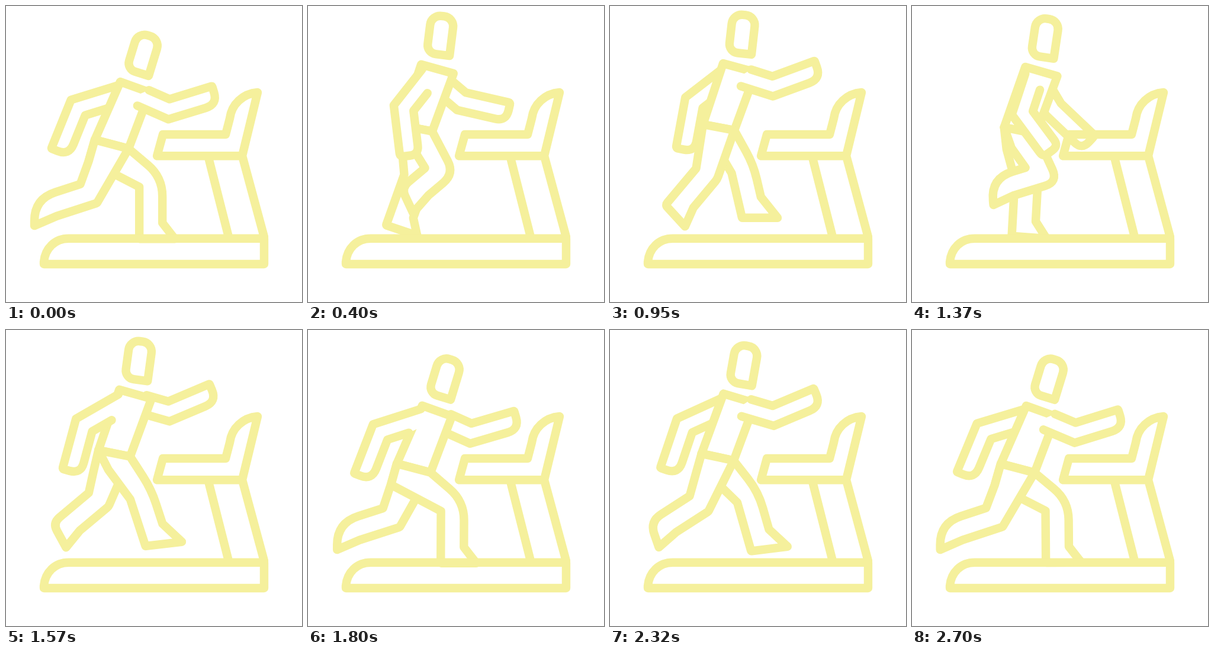
An HTML page with a canvas for the animation above (2.72 s loop, 500 by 500 pixels).

```html
<!DOCTYPE html>
<html lang="en">
<head>
<meta charset="utf-8">
<title>Treadmill runner</title>
<style>
  html, body { margin: 0; width: 100%; height: 100%; overflow: hidden; background: #fff; }
  canvas { display: block; width: 500px; height: 500px; }
</style>
</head>
<body>
<canvas id="stage" width="500" height="500"></canvas>
<script>
const ctx = document.getElementById('stage').getContext('2d');
const LOOP = 2720, HOLD = 220, STEP = 25;

// Moments of contact, apex, contact, ...
const BEATS = [205, 460, 700, 950, 1230, 1515, 1787, 2078, 2720];

// A limb cycle is two strides: stance at 0..1, swing at 1..2.
const KNOTS = [0, .24, .4, .5, 1, 1.24, 1.4, 1.5];

// Joint angles in degrees at the knots; 90 points down.
const LEG = {
  thigh: [44, 82, 93, 105, 115, 64, 61, 60],
  shin: [90, 93, 114, 131, 162, 163, 132, 75],
  foot: [0, 4, 23, 49, 90, 85, 58, -2],
  reach: [96, 97, 93, 85, 90, 84, 67, 81]
};
const ARM = {
  swing: [-82, 31, 58, 90, 78, -7, -31, -46],
  fore: [112, 45, 6, -21, -17, 52, 88, 101]
};
const DROP = [1, .2, .04, 0, 1, .2, .04, 0];

const rad = deg => deg * Math.PI / 180;
const sin = deg => Math.sin(rad(deg));
const cos = deg => Math.cos(rad(deg));
const mix = (a, b, t) => a + (b - a) * t;
const add = (a, b, k = 1) => [a[0] + b[0] * k, a[1] + b[1] * k];
const polar = (p, deg, len) => [p[0] + cos(deg) * len, p[1] + sin(deg) * len];
const heading = (a, b) => Math.atan2(b[1] - a[1], b[0] - a[0]) * 180 / Math.PI;

// Cyclic cubic through the knots; turning points keep a slight follow-through.
function sample(vals, phase) {
  const n = vals.length, p = phase % 2;
  const at = i => KNOTS[(i + n) % n] + 2 * Math.floor(i / n);
  const val = i => vals[(i + n) % n];
  const slope = i => (val(i + 1) - val(i)) / (at(i + 1) - at(i));
  const tangent = i => {
    const s = slope(i - 1), t = slope(i);
    return s * t > 0 ? 2 * s * t / (s + t) : (s + t) / 8;
  };
  let i = n - 1;
  while (KNOTS[i] > p) i--;
  const h = at(i + 1) - at(i), u = (p - at(i)) / h, v = 1 - u;
  return mix(val(i), val(i + 1), u * u * (3 - 2 * u))
    + h * u * v * (tangent(i) * v - tangent(i + 1) * u);
}

// Half of the mitre across a bent joint, pointing to its front side.
function mitre(angleIn, angleOut, half) {
  const mid = (angleIn + angleOut) / 2;
  return polar([0, 0], mid - 90, half / cos((angleOut - angleIn) / 2));
}

function toward(a, b, dist) {
  const len = Math.hypot(b[0] - a[0], b[1] - a[1]) || 1;
  const k = Math.min(dist / len, .9);
  return [mix(a[0], b[0], k), mix(a[1], b[1], k)];
}

// Path through points; round maps a point index to its corner size.
function trace(pts, round = {}) {
  ctx.beginPath();
  ctx.moveTo(...pts[0]);
  for (let i = 1; i < pts.length; i++) {
    if (round[i]) {
      ctx.lineTo(...toward(pts[i], pts[i - 1], round[i]));
      ctx.quadraticCurveTo(...pts[i], ...toward(pts[i], pts[i + 1], round[i]));
    } else ctx.lineTo(...pts[i]);
  }
}

function solid(pts, round) {
  trace(pts, round);
  ctx.closePath();
  ctx.fill();
  ctx.stroke();
}

// The body sinks from its raised pose (0) to its contact pose (1).
function poseBody(drop) {
  return {
    drop,
    left: [191 + 2 * drop, 97 + 31 * drop],
    right: [246 - 3 * drop, 112 + 34 * drop],
    hipFront: [210 - 3 * drop, 210 + 31 * drop],
    hipBack: [157 - 7 * drop, 200 + 26 * drop],
    chin: [239 + 2 * drop, 82 + 36 * drop],
    tilt: 6.5 + 10.5 * drop
  };
}

function drawArm(phase, body) {
  const swing = sample(ARM.swing, phase), fore = sample(ARM.fore, phase);
  const elbow = add(body.left, [6 + 78 * sin(swing), 38 + 40 * cos(swing)]);
  const upper = heading(add(body.left, [15, 17]), elbow);
  const bend = mitre(upper, fore, 16), wrist = mitre(fore, fore, 16);
  const hand = polar(elbow, fore, 81);
  const back = add(elbow, bend, -1), front = add(elbow, bend);
  const pts = [
    polar(back, upper, 14 * sin(swing) - 71), back, add(hand, wrist, -1),
    add(hand, wrist), front, polar(front, upper, -38)
  ];
  const round = { 2: 11 + 10 * sin(swing), 3: 11 - 10 * sin(swing) };
  const pit = [mix(body.left[0], body.right[0], .5), mix(body.left[1], body.right[1], .5) + 15];
  trace([...pts, pit], round);
  ctx.fill();
  trace(pts, round);
  ctx.stroke();
}

function drawLeg(phase, body) {
  const [thigh, shin, foot, reach] =
    [LEG.thigh, LEG.shin, LEG.foot, LEG.reach].map(v => sample(v, phase));
  const { hipBack, hipFront, drop } = body;
  const hip = [mix(hipBack[0], hipFront[0], .5), mix(hipBack[1], hipFront[1], .5)];
  const knee = polar(hip, thigh, 81 + 11 * drop);
  const bend = mitre(thigh, shin, 19.5), ankle = mitre(shin, shin, 19.5);
  const kneeBack = add(knee, bend, -1);
  const seat = polar(hipBack, mix(heading(hipBack, kneeBack), 106, drop), 37);
  const heel = add(polar(knee, shin, reach), ankle, -1);
  const toe = polar(heel, foot, 60 - 15 * sin(foot));
  const instep = add(polar(knee, shin, reach - 27), ankle);
  solid(
    [hipBack, seat, kneeBack, heel, toe, instep, add(knee, bend), hipFront],
    { 3: Math.max(1, shin - 125), 6: Math.max(1, 52 - thigh * .45) }
  );
}

function drawHead({ chin, tilt }) {
  ctx.save();
  ctx.translate(...chin);
  ctx.rotate(rad(tilt));
  ctx.beginPath();
  ctx.roundRect(-39, -65, 39, 65, [17, 17, 0, 15]);
  ctx.stroke();
  ctx.restore();
}

const MACHINE = new Path2D(
  'M64 436V432C66 410 82 392.7 106 392.7H436V436Z' +
  'M255 253.3H399L425 146C400 148 381 166 378 190L371 217H265Z' +
  'M342 256L376 390M399 253L436 390');

function phaseAt(t) {
  if (t < HOLD) return 0;
  const q = HOLD + Math.floor((t - HOLD) / STEP + .2) * STEP;
  let i = 0;
  while (i < BEATS.length - 2 && BEATS[i + 1] <= q) i++;
  return (i + (q - BEATS[i]) / (BEATS[i + 1] - BEATS[i])) / 2;
}

function draw(t) {
  const phase = phaseAt(t);
  const body = poseBody(sample(DROP, phase));
  ctx.fillStyle = '#fff';
  ctx.fillRect(0, 0, 500, 500);
  ctx.strokeStyle = '#f5f09c';
  ctx.lineWidth = 14.4;
  ctx.lineCap = ctx.lineJoin = 'round';

  drawLeg(phase, body);
  drawArm(phase, body);
  solid([body.left, body.right, body.hipFront, body.hipBack]);
  drawLeg(phase + 1, body);
  drawArm(phase + 1, body);
  drawHead(body);
  ctx.stroke(MACHINE);
}

const start = performance.now();
function tick() {
  draw((performance.now() - start) % LOOP);
  requestAnimationFrame(tick);
}
tick();
</script>
</body>
</html>
```
